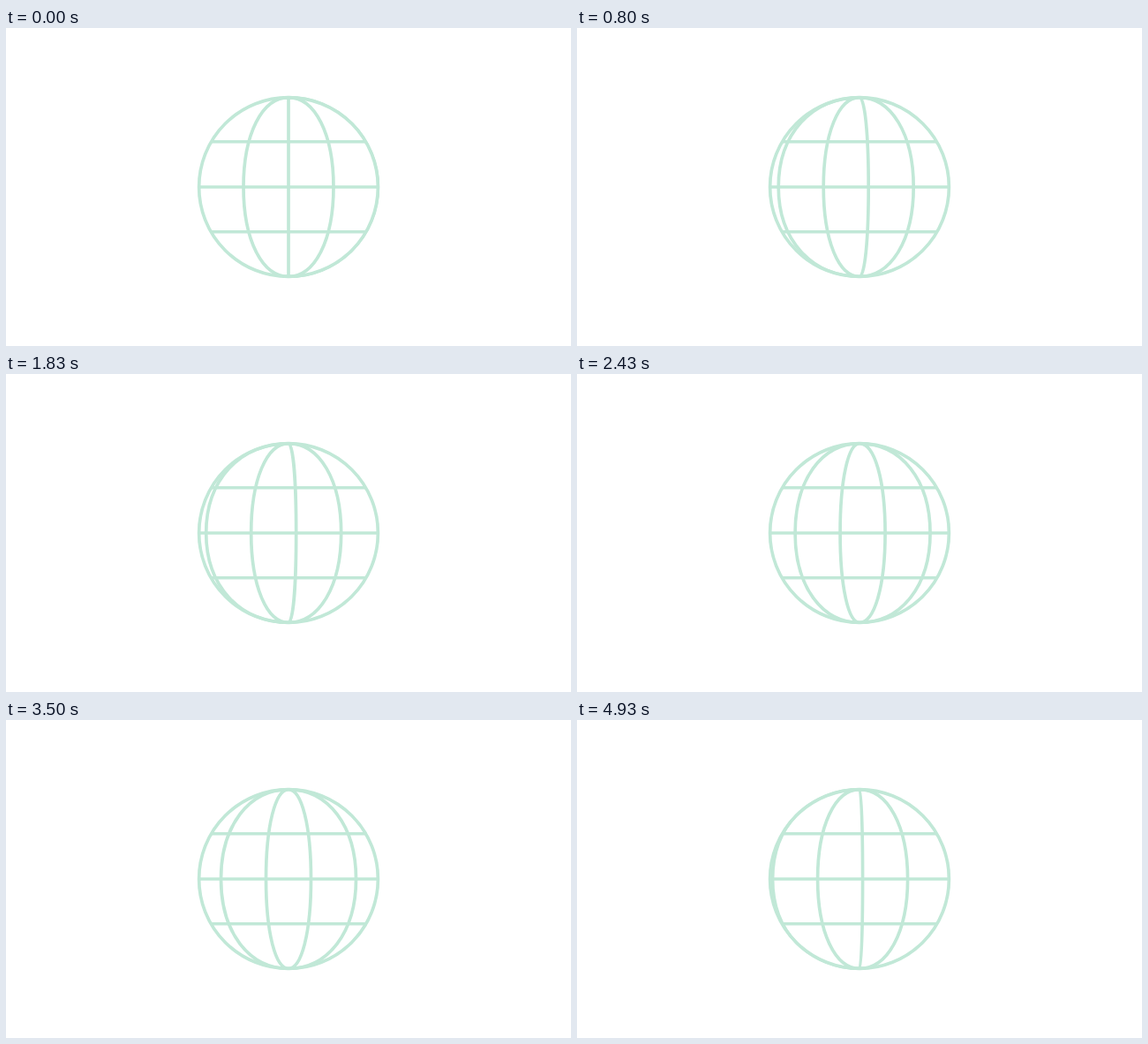
Animation, 640 px wide and 360 px high, one loop 5000 ms. Source, as an HTML page:

```html
<!DOCTYPE html>
<html lang="en">
<head>
<meta charset="utf-8">
<title>Turning globe</title>
<style>
  html, body { margin: 0; width: 100%; height: 100%; overflow: hidden; background: #fff; }
  svg { display: block; width: 640px; height: 360px; }
</style>
</head>
<body>
<svg viewBox="0 0 640 360">
  <defs><clipPath id="disc"><circle cx="320" cy="180" r="103.2"/></clipPath></defs>
  <g fill="none" stroke="#c1e8d7" stroke-width="3.7">
    <circle cx="320" cy="180" r="101.4"/>
    <path d="M219 180H421" />
    <path d="M232.5 128.8H407.5M232.5 230.8H407.5" stroke-width="3.4"/>
    <path id="meridians" clip-path="url(#disc)"/>
  </g>
</svg>
<script>
  const CX = 320, CY = 180, R = 101.4, GAP = 51, ROUND = 0.59;
  const LOOP = 5000, TURN = 1000;
  const meridians = document.getElementById('meridians');

  // Half an oval from pole to pole, bulging sideways by u.
  function meridian(u) {
    const x = CX + u, bend = CX + u * ROUND, rise = R * ROUND;
    return `M${CX} ${CY - R}C${bend} ${CY - R} ${x} ${CY - rise} ${x} ${CY}` +
           `S${bend} ${CY + R} ${CX} ${CY + R}`;
  }

  // The picture holds for 30 ms and 70 ms in turn.
  function hold(ms) {
    const rest = ms % 100;
    return ms - rest + (rest >= 30 ? 30 : 0);
  }

  function draw(ms) {
    const phase = (hold(ms % LOOP) % TURN) / TURN;
    meridians.setAttribute('d', [-1, 0, 1, 2].map(k => meridian(GAP * (k - phase))).join(''));
  }

  const start = performance.now();
  function tick() {
    draw(performance.now() - start);
    requestAnimationFrame(tick);
  }
  draw(0);
  requestAnimationFrame(tick);
</script>
</body>
</html>
```
